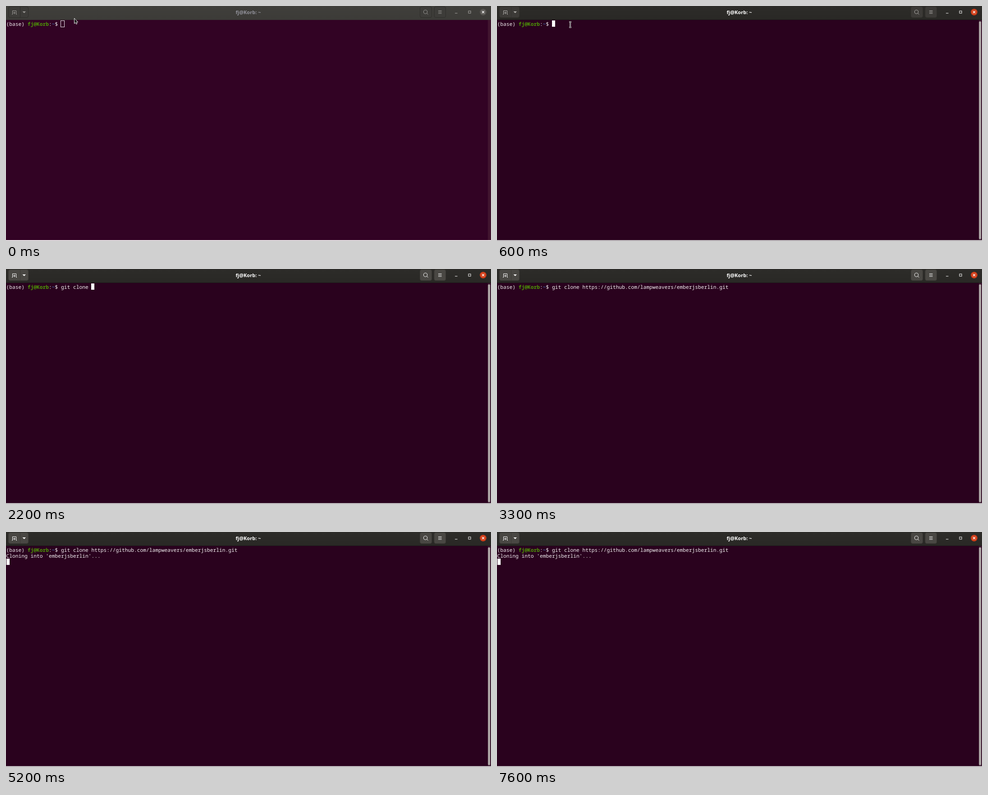
An HTML page for the animation above (8 s loop, 1076 by 521 pixels).

```html
<!DOCTYPE html>
<html lang="en">
<head>
<meta charset="utf-8">
<title>Terminal</title>
<style>
  html, body { margin: 0; width: 100%; height: 100%; overflow: hidden; background: #2a021e; }
  svg {
    display: block;
    --screen: #2a021e; --bar-top: #2d2c29; --bar-bottom: #292825; --edge: #1d1b19;
    --title: #fff; --control: #fff; --close: #d23f1a;
    --trough: #3b1930; --thumb: #b0a9a8; --floor: #c9c7c8;
  }
  svg.idle {
    --screen: #320324; --bar-top: #403f3b; --bar-bottom: #3c3b38; --edge: #383633;
    --title: #92929b; --control: #aaa8a5; --close: #595753;
    --trough: #41152f; --thumb: #41152f; --floor: #f2f0f1;
  }
  .button { fill: var(--button); stroke: var(--rim); }
  .icon { fill: none; stroke: var(--icon); }
  .control { fill: none; stroke: var(--control); }
  .title { font: bold 11px "Open Sans", "Noto Sans", sans-serif; text-anchor: middle; fill: var(--title); }
  .line {
    font: 11.25px "Noto Sans Mono", "DejaVu Sans Mono", monospace;
    white-space: pre; fill: #f4f2f3; text-rendering: geometricPrecision;
  }
  .user { fill: #4e9a06; font-weight: bold; }
  .path { fill: #3f68a8; font-weight: bold; }
</style>
</head>
<body>
<svg id="stage" width="1076" height="521" viewBox="0 0 1076 521">
  <defs>
    <linearGradient id="bar" x2="0" y2="1">
      <stop stop-color="var(--bar-top)"/>
      <stop offset="1" stop-color="var(--bar-bottom)"/>
    </linearGradient>
  </defs>

  <rect width="1076" height="521" fill="var(--screen)"/>
  <rect width="1076" height="31" fill="url(#bar)"/>
  <rect y="30" width="1076" height="1" fill="var(--edge)"/>

  <g class="button">
    <rect x="5.5" y="1.5" width="44" height="24" rx="3.5"/>
    <path d="M31.5 1.5V25.5"/>
    <rect x="918.5" y="1.5" width="26" height="24" rx="3.5"/>
    <rect x="950" y="1.5" width="25.5" height="24" rx="3.5"/>
  </g>
  <g class="icon">
    <path d="M13 18.5H14.5V10.5H22.5V18.5H24M18.5 12.5V18M15.8 15.2H21.2"/>
    <path d="M36.5 12H44L40.3 15.8Z" style="fill:var(--icon);stroke:none"/>
    <circle cx="930.5" cy="13" r="4.1"/>
    <path d="M933.5 16L936.5 18.8M959 10.5H966.5M959 13.5H966.5M959 16.5H966.5"/>
  </g>
  <g class="control">
    <path d="M996 16H1001.5"/>
    <rect x="1026" y="11" width="5" height="5"/>
    <circle cx="1058.5" cy="13.5" r="7.3" fill="var(--close)" stroke="none"/>
    <path d="M1056 11L1061 16M1061 11L1056 16" stroke="#fff" stroke-width="1.3"/>
  </g>
  <text class="title" x="537.5" y="17.5">fj@Korb: ~</text>

  <rect x="1069" y="31" width="7" height="488" fill="var(--trough)"/>
  <rect x="1069.3" y="34" width="4.7" height="483" rx="2.3" fill="var(--thumb)"/>
  <rect y="519" width="1076" height="2" fill="var(--floor)"/>

  <text class="line" x="0.5" y="43.5">(base) <tspan class="user">fj@Korb</tspan>:<tspan class="path">~</tspan>$ <tspan id="command"></tspan></text>
  <text class="line" id="output" x="0.5" y="57">Cloning into 'emberjsberlin'...</text>
  <rect id="caret" width="7" height="14"/>

  <path id="arrow" d="M0 0V12L2.6 9.6L4.3 13.3L6.3 12.4L4.6 8.8H8Z" fill="#161616" stroke="#eee" stroke-width="1"/>
  <g id="beam" fill="none">
    <path d="M-2.5 -6H2.5M0 -6V6M-2.5 6H2.5" stroke="#f2f2f2" stroke-width="2.6"/>
    <path d="M-2.3 -6H2.3M0 -6V6M-2.3 6H2.3" stroke="#181216" stroke-width="0.9"/>
  </g>
</svg>
<script>
const LOOP = 8000, CELL = 6.75, PROMPT_CELLS = 18;
const FOCUS = 600, HIDE_POINTER = 1300, RUN = 4500;
const FULL_COMMAND = "git clone https://github.com/lampweavers/emberjsberlin.git";

// Each row starts at its time and holds until the next one.
const typing = [
  [0, 0], [1300, 1], [1400, 3], [1500, 4], [1700, 5], [1900, 6],
  [2000, 7], [2100, 9], [2200, 10], [3300, FULL_COMMAND.length]
];
const blink = [
  [0, true], [1100, false], [1300, true], [3300, false], [3900, true], [4600, false],
  [5200, true], [5800, false], [6400, true], [7500, false], [7600, true]
];
const pointer = [
  [0, "arrow", 151.5, 27], [100, "arrow", 149, 29], [200, "beam", 151, 36],
  [300, "beam", 157, 38], [400, "beam", 161.5, 39.7], [600, "beam", 162.5, 41.2]
];
const buttons = [
  [0, "#3d3c39", "#2e2d2a", "#9c9a97"], [600, "#3c3a37", "#35332f", "#b3b1ae"],
  [700, "#43413d", "#393733", "#dcdbd9"], [800, "#494743", "#3c3a36", "#fff"]
];

const $ = id => document.getElementById(id);
const stage = $("stage");
const at = (rows, t) => rows.findLast(row => row[0] <= t).slice(1);
const show = (id, visible) => $(id).setAttribute("visibility", visible ? "visible" : "hidden");
const setAttributes = (id, values) => {
  for (const name in values) $(id).setAttribute(name, values[name]);
};

function drawCaret(t, typed) {
  const focused = t >= FOCUS;
  const column = t < RUN ? PROMPT_CELLS + typed : 0;
  const x = Math.round(column * CELL + 0.1) + (column ? 0 : 1);
  const y = t < RUN ? 32 : 59;
  setAttributes("caret", focused
    ? { x, y, width: 7, height: 14, fill: "#fff", stroke: "none" }
    : { x: x - 0.5, y: y + 0.5, width: 8, height: 14, fill: "none", stroke: "#eee" });
  show("caret", at(blink, t)[0]);
}

function drawPointer(t) {
  const [shape, x, y] = at(pointer, t);
  for (const id of ["arrow", "beam"]) show(id, id === shape && t < HIDE_POINTER);
  setAttributes(shape, { transform: `translate(${x} ${y})` });
}

function render(t) {
  const [typed] = at(typing, t);
  stage.classList.toggle("idle", t < FOCUS);
  at(buttons, t).forEach((color, i) =>
    stage.style.setProperty(["--button", "--rim", "--icon"][i], color));
  $("command").textContent = FULL_COMMAND.slice(0, typed);
  show("output", t >= RUN);
  drawCaret(t, typed);
  drawPointer(t);
}

const start = performance.now();
function tick() {
  render((performance.now() - start) % LOOP);
  requestAnimationFrame(tick);
}
tick();
</script>
</body>
</html>
```
